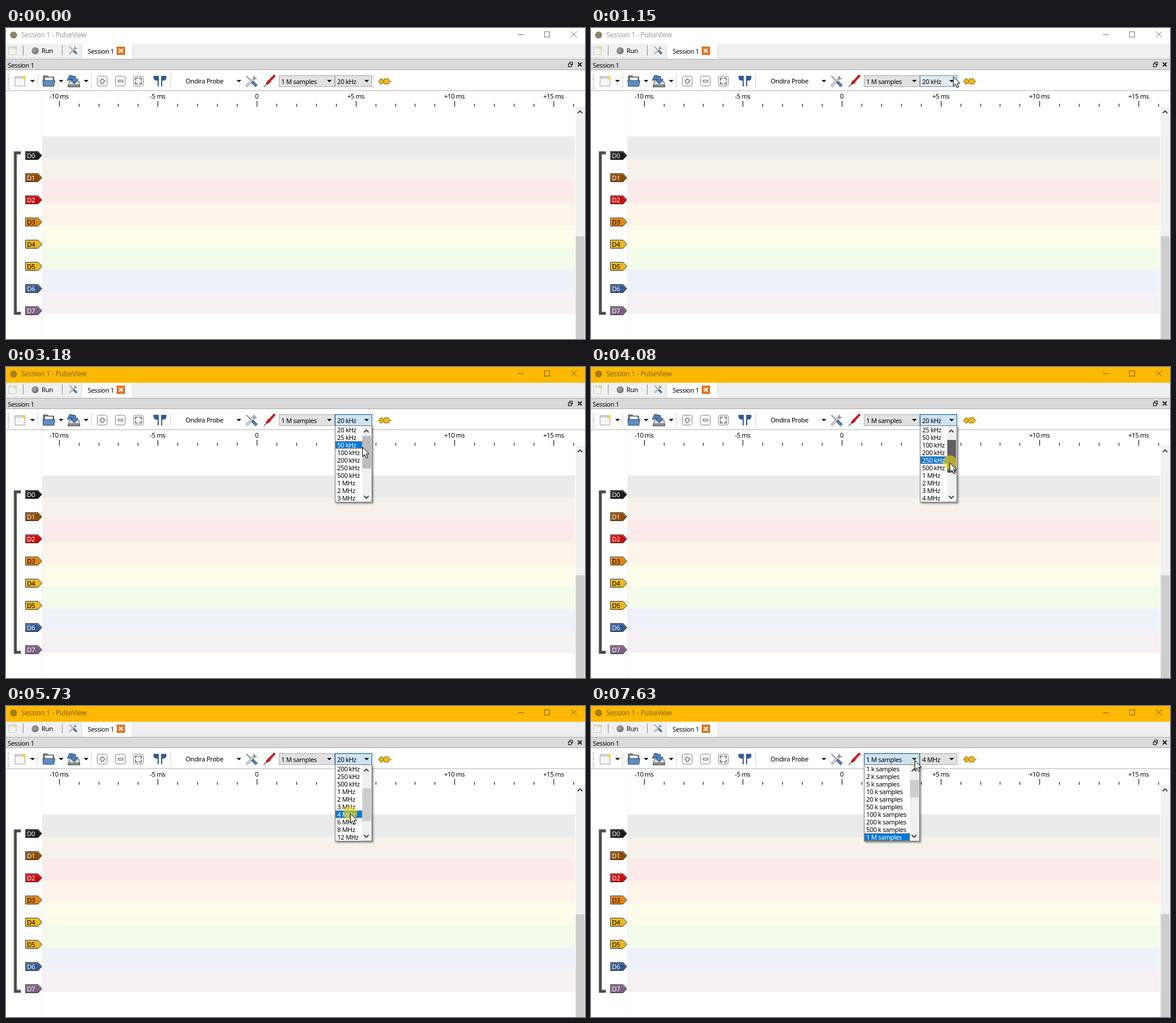
An HTML page with a canvas for the animation above (8 s loop, 993x533 px).

```html
<!DOCTYPE html>
<html lang="en">
<head>
<meta charset="utf-8">
<title>Session 1</title>
<style>
html, body { margin: 0; width: 100%; height: 100%; overflow: hidden; background: #fff; }
canvas { display: block; }
</style>
</head>
<body>
<canvas id="stage" width="993" height="533"></canvas>
<script>
const c = document.getElementById('stage').getContext('2d');
const LOOP = 8000, ENTER = 320, RATE_OPEN = 2020, RATE_CLOSE = 5860, SAMPLES_OPEN = 7470;
const GRAB = 3530, RELEASE = 4900;       // dragging the list's scrollbar
const LEAVE_LIST = 3360, BACK_IN_LIST = 4960;

// Pointer moves: start, end, x, y
const ENTRY = [888, 505];
const MOVES = [
  [ENTER, 1150, 621, 83], [1490, 1690, 614, 90], [2960, LEAVE_LIST, 608, 171],
  [LEAVE_LIST, GRAB, 615, 157], [GRAB, 4290, 615, 165], [4360, 4640, 615, 180],
  [RELEASE, 5250, 590, 184], [RATE_CLOSE, 6490, 546, 99], [6560, 7180, 555, 93]
];
const PRESSES = [[1950, 1950], [GRAB, RELEASE], [5730, RATE_CLOSE], [7400, 7400]];

const RATES = [20, 25, 50, 100, 200, 250, 500].map(n => n + ' kHz')
  .concat([1, 2, 3, 4, 6, 8, 12].map(n => n + ' MHz'));
const SAMPLES = [1, 10, 100].flatMap(d => [1, 2, 5].map(n => n * d + ' k samples')).concat('1 M samples');
const BANDS = ['#161616', '#8f5202', '#cc0000', '#f57900', '#edd400', '#73d216', '#3465a4', '#75507b'];
const FLAGS = ['#1a1a1a', '#8f4c00', '#cc0a0a', '#e3850f', '#ebb71e', '#ebb71e', '#325a94', '#7d5f85'];

const clamp = (v, lo, hi) => Math.min(hi, Math.max(lo, v));
const ramp = (t, start, length = 200) => clamp((t - start) / length, 0, 1);
const mix = (a, b, p) => `rgb(${a.map((v, i) => Math.round(v + (b[i] - v) * p))})`;

function pointerAt(t) {
  let [x, y] = ENTRY;
  for (const [from, to, endX, endY] of MOVES) {
    const p = ramp(t, from, to - from), ease = p * p * (3 - 2 * p);
    x += (endX - x) * ease;
    y += (endY - y) * ease;
  }
  return [x, y];
}
const glowAt = t => Math.max(...PRESSES.map(([down, up]) => t < down ? 0 : .6 * (1 - ramp(t, up, 270))));
const thumbAt = t => Math.round(pointerAt(clamp(t, GRAB, RELEASE))[1]) - 39;
const scrollAt = t => Math.round((thumbAt(t) - 118) / 5.75);

// The list keeps its last row while the pointer is on the scrollbar.
function pickedAt(t) {
  const seen = t < BACK_IN_LIST ? Math.min(t, LEAVE_LIST) : t;
  return scrollAt(seen) + Math.max(0, Math.floor((pointerAt(seen)[1] - 101) / 13));
}
function thumbGray(t) {
  if (t >= GRAB && t < RELEASE) return 96;
  const [x, y] = pointerAt(t);
  return y < 101 ? 205 : Math.round(205 - 39 * ramp(x, 607, 8));
}

function rect(x, y, w, h, fill, stroke) {
  if (fill) { c.fillStyle = fill; c.fillRect(x, y, w, h); }
  if (stroke) { c.strokeStyle = stroke; c.lineWidth = 1; c.strokeRect(x + .5, y + .5, w - 1, h - 1); }
}
function path(points, fill, stroke, width = 1, closed = true) {
  c.beginPath();
  for (let i = 0; i < points.length; i += 2) c.lineTo(points[i], points[i + 1]);
  if (closed) c.closePath();
  if (fill) { c.fillStyle = fill; c.fill(); }
  if (stroke) { c.strokeStyle = stroke; c.lineWidth = width; c.stroke(); }
}
const line = (points, color, width) => path(points, null, color, width, false);
function disc(x, y, r, fill) {
  c.beginPath(); c.arc(x, y, r, 0, 7); c.fillStyle = fill; c.fill();
}
function text(s, x, y, color = '#000', align = 'left') {
  c.font = '11px "Noto Sans", "Open Sans", sans-serif';
  c.letterSpacing = '-0.35px';
  c.textAlign = align;
  c.fillStyle = color;
  c.fillText(s, x, y);
}
function cross(x, y, r, color, width) {
  line([x - r, y - r, x + r, y + r], color, width);
  line([x + r, y - r, x - r, y + r], color, width);
}
const arrow = (x, y) => path([x - 3.5, y - 2, x + 4.5, y - 2, x + .5, y + 2], '#000');
const chevron = (x, y, d) => line([x - 4, y + 2 * d, x, y - 2 * d, x + 4, y + 2 * d], '#404040', 1.8);

function tools(x, y, s) {
  c.save();
  c.translate(x, y); c.scale(s, s);
  line([-8, -8, 1, 1], '#999', 2);
  line([1, 1, 8, 8], '#2f5a94', 4.5);
  line([2, 2, 8, 8], '#6f9ccc', 1.5);
  line([-8, 8, 5, -5], '#7c868f', 3.5);
  line([-8, 8, 5, -5], '#dde1e4', 1.8);
  line([4, -8, 4, -4, 8, -4], '#7c868f', 2);
  c.restore();
}
function page(x, y, w, h) {
  rect(x, y, w, h, '#f6f6f4', '#a5a5a0');
  rect(x + 1, y + 1, w - 2, 3, '#cfd8e3');
  disc(x + w - 2, y + 2, 3, '#f3d43c');
}
function zoomButton(x) {
  c.beginPath(); c.roundRect(x - 8.5, 82.5, 17, 17, 3);
  c.fillStyle = '#f4f4f2'; c.fill();
  c.strokeStyle = '#8b8b88'; c.lineWidth = 1; c.stroke();
}

function titleBar(active) {
  const ink = active ? '#7d5d0c' : '#999', mark = active ? '#7d5d0c' : '#777';
  rect(0, 0, 993, 27, active ? '#ffb900' : '#fff');
  disc(13, 12, 6, active ? '#a57c18' : '#8d8468');
  c.font = '12px "Open Sans", "Noto Sans", sans-serif';
  c.letterSpacing = '-0.3px';
  c.textAlign = 'left';
  c.fillStyle = ink;
  c.fillText('Session 1 - PulseView', 26, 16);
  rect(878, 11, 10, 1, mark);
  rect(923, 6, 10, 10, null, mark);
  cross(974, 11, 5, mark, 1);
}

function sessionBar() {
  rect(0, 27, 993, 25, '#f0f0f0');
  rect(0, 51, 993, 1, '#dcdcdc');
  rect(129, 27, 89, 25, '#fff', '#dadada');
  rect(130, 27, 87, 26, '#fff');
  c.globalAlpha = .5;
  page(4, 32, 14, 14);
  c.globalAlpha = 1;
  for (const x of [29, 96]) rect(x, 30, 1, 17, '#8a8a8a');
  disc(50, 39, 6, '#777');
  disc(49, 38, 4, '#989898');
  text('Run', 61, 43);
  tools(115, 38, .78);
  text('Session 1', 140, 44);
  rect(190, 32, 14, 14, '#ee7a24', '#c4500c');
  cross(197, 39, 3, '#fff', 2);
  rect(0, 53, 993, 19, '#dadada');
  for (const y of [53, 71]) rect(0, y, 993, 1, '#a8a8a8');
  text('Session 1', 3, 68);
  rect(966, 58, 6, 6, null, '#000');
  rect(964, 61, 6, 6, '#dadada', '#000');
  cross(984, 62.5, 3.3, '#000', 1.7);
}

function toolBar() {
  rect(0, 107, 993, 1, '#b5b5b5');
  for (let y = 79; y < 104; y += 4) rect(3, y, 2, 2, '#bbb');
  for (const x of [54, 146, 282, 630]) rect(x, 79, 1, 24, '#d4d4d4');
  for (const x of [45, 94, 137, 399]) arrow(x, 91);
  page(15, 83, 18, 17);
  // open
  path([64, 82, 71, 82, 73, 84, 82, 84, 82, 99, 64, 99], '#727b80', '#4c5357');
  rect(67, 85, 13, 7, '#f2f2ef');
  path([63, 90, 84, 90, 82, 100, 64, 100], '#5f8dbd', '#28517f');
  // save
  path([109, 91, 125, 91, 127, 101, 106, 101], '#d8dad7', '#555');
  rect(107, 97, 19, 4, '#9ea29d', '#555');
  path([105, 90, 109, 81, 119, 83, 120, 88, 124, 88, 117, 96, 110, 88, 114, 88], '#4d80b8', '#234b7d');
  // zoom in, zoom out, zoom to fit
  [165, 196, 227].forEach(zoomButton);
  for (const x of [165, 196]) rect(x - 4, 89, 9, 4, '#fff', '#666');
  rect(163, 87, 4, 9, '#fff', '#666');
  rect(162, 90, 7, 2, '#fff');
  for (const sx of [-1, 1]) for (const sy of [-1, 1]) {
    const x = 227 + 5 * sx, y = 91 + 5 * sy;
    line([x - 4 * sx, y, x, y, x, y - 4 * sy], '#666', 1.5);
    // cursor flags
    if (sy > 0) {
      const at = d => 264 + d * sx;
      path([at(2), 82, at(11), 82, at(11), 87, at(8), 90, at(4), 90, at(4), 100, at(2), 100], '#2f5a9c');
    }
  }
  text('Ondira Probe', 308, 95);
  tools(421, 91, 1.1);
  // probe
  line([442, 101, 450, 93], '#555', 1.3);
  line([447, 96, 461, 81], '#a40000', 4);
  line([449, 90, 453, 94], '#cc0a0a', 3);
  line([449, 94, 460, 82], '#ef2929', 1.5);
  // decoder
  line([638, 91.5, 661, 91.5], '#8a6a00', 1);
  path([640, 91.5, 642, 87, 645, 87, 648, 91.5, 645, 96, 642, 96], '#edb91e', '#8a6a00');
  path([647, 91.5, 649, 87, 656, 87, 659, 91.5, 656, 96, 649, 96], '#edb91e', '#8a6a00');
}

function traceView() {
  for (let i = -10; i <= 16; i++) {
    const x = Math.round(430 + i * 33.93), major = i % 5 === 0;
    rect(x, major ? 125 : 130, 1, major ? 10 : 5, '#000');
    if (major) text(i ? (i > 0 ? '+' : '') + i + ' ms' : '0', x, 121, '#000', 'center');
  }
  rect(62, 108, 1, 425, '#efefef');
  line([25.5, 214, 16, 214, 16, 489, 25.5, 489], '#4b4b4b', 5);
  BANDS.forEach((band, i) => {
    const y = 218.5 + 38 * i, dark = i > 2 && i < 6;
    c.globalAlpha = .082;
    rect(63, 186 + 38 * i, 913, 38, band);
    c.globalAlpha = 1;
    path([33.5, y - 7, 55, y - 7, 61.5, y, 55, y + 7, 33.5, y + 7], FLAGS[i], '#332a20');
    line([34.5, y + 6, 34.5, y - 6, 54.5, y - 6, 60, y], 'rgba(255,255,255,.35)', 1);
    text('D' + i, 36, y + 4.5, dark ? '#000' : '#fff');
  });
  rect(63, 490, 913, 1, '#fff');
  rect(977, 135, 16, 398, '#f0f0f0');
  chevron(984.5, 144, 1);
  rect(977, 357, 15, 176, '#cdcdcd');
}

function combo(x, w, label, hover, open) {
  const fill = open ? '#cce4f7' : mix([225, 225, 225], [229, 241, 251], hover);
  const edge = open ? '#005499' : mix([173, 173, 173], [0, 120, 215], hover);
  rect(x, 81, w, 20, fill, edge);
  text(label, x + 4, 96);
  arrow(x + w - 10, 91);
}

function popup(x, w, items, first, picked, thumbY, thumbH, gray) {
  c.save();
  c.shadowColor = 'rgba(0,0,0,.45)';
  c.shadowBlur = 3;
  c.shadowOffsetX = c.shadowOffsetY = 2;
  rect(x, 100, w, 132, '#fff');
  c.restore();
  rect(x, 100, w, 132, '#fff', '#767676');
  const barX = x + w - 18;
  items.slice(first, first + 10).forEach((item, row) => {
    const y = 101 + 13 * row, on = first + row === picked;
    if (on) {
      rect(x + 1, y, barX - x, 13, '#0078d7');
      c.setLineDash([1, 1]);
      rect(x + 1, y, barX - x, 13, null, '#ff8728');
      c.setLineDash([]);
    }
    text(item, x + 4, y + 11, on ? '#fff' : '#000');
  });
  rect(barX + 1, 101, 16, 130, '#f0f0f0');
  chevron(x + w - 10, 110, 1);
  chevron(x + w - 10, 223, -1);
  rect(barX + 1, thumbY, 15, thumbH, `rgb(${gray},${gray},${gray})`);
}

function pointer(x, y) {
  c.save();
  c.translate(x + .5, y + .5);
  path([0, 0, 0, 16, 3.7, 12.5, 6.5, 18.5, 9, 17.5, 6.3, 11.5, 11.3, 11.5], '#fff', '#000');
  c.restore();
}

function draw(t) {
  const rateOpen = t >= RATE_OPEN && t < RATE_CLOSE, samplesOpen = t >= SAMPLES_OPEN;
  rect(0, 0, 993, 533, '#fff');
  titleBar(t >= RATE_OPEN);
  sessionBar();
  toolBar();
  traceView();
  combo(468, 96, '1 M samples', ramp(t, 6600), samplesOpen);
  combo(564, 64, t < RATE_CLOSE ? '20 kHz' : '4 MHz', ramp(t, 1050) - ramp(t, RATE_CLOSE), rateOpen);
  if (rateOpen) popup(564, 64, RATES, scrollAt(t), pickedAt(t), thumbAt(t), 56, thumbGray(t));
  if (samplesOpen) popup(468, 96, SAMPLES, 0, 9, 127, 30, 205);
  if (t < ENTER) return;
  const [x, y] = pointerAt(t).map(Math.round), glow = glowAt(t);
  if (glow) disc(x + .5, y - .5, 12, `rgba(240,216,20,${glow})`);
  pointer(x, y);
}

const start = performance.now();
function tick() {
  draw((performance.now() - start) % LOOP);
  requestAnimationFrame(tick);
}
tick();
</script>
</body>
</html>
```
